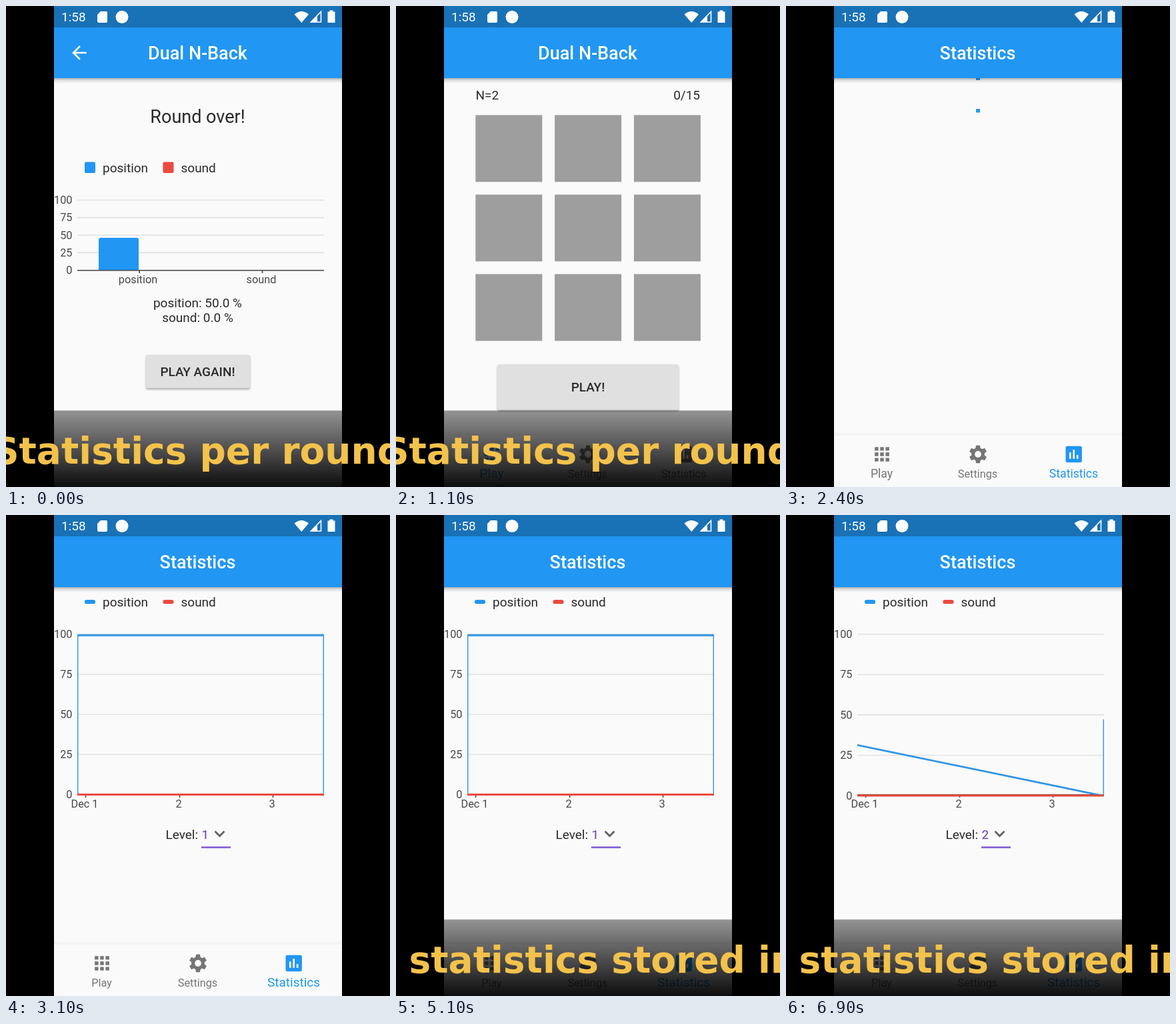
These frames come from a looping animation (576 px wide and 720 px high, 7 s). An HTML page:

```html
<!DOCTYPE html>
<html lang="en">
<head>
<meta charset="utf-8">
<title>Dual N-Back</title>
<style>
html, body { margin: 0; height: 100%; overflow: hidden; background: #000; }
svg { display: block; width: 576px; height: 720px; }
text { font: 19px Roboto, sans-serif; fill: #2a2a2a; }
.title { font-size: 27px; font-weight: 500; fill: #fff; }
.head { font-size: 27px; }
.tick { font-size: 16.3px; fill: #484848; }
.btn { font-weight: 500; }
.mid { text-anchor: middle; }
.end { text-anchor: end; }
.paper { fill: #fafafa; }
.blue { fill: #2196f3; }
.red { fill: #ea4a3f; }
.level { fill: #673ab7; }
.raised { fill: #e0e0e0; filter: drop-shadow(0 2px 1.5px rgba(0,0,0,.32)); }
.grid { stroke: #e0e0e0; stroke-width: 1.4; }
.axis { stroke: #484848; stroke-width: 1.6; }
.nav { color: #757575; }
.nav.on { color: #2196f3; }
.nav * { fill: currentColor; }
.nav .paper { fill: #fafafa; }
.nav text { font-size: 16.3px; }
#menuBox { filter: drop-shadow(0 5px 6px rgba(0,0,0,.28)) drop-shadow(0 4px 17px rgba(0,0,0,.25)); }
#captionText { font: bold 55px "DejaVu Sans", sans-serif; fill: #f3c24c; }
</style>
</head>
<body>
<svg viewBox="0 0 576 720">
  <defs>
    <linearGradient id="shade" x2="0" y2="1">
      <stop stop-opacity=".41"/><stop offset="1" stop-opacity=".95"/>
    </linearGradient>
    <linearGradient id="drop" x2="0" y2="1">
      <stop stop-opacity=".3"/><stop offset=".4" stop-opacity=".11"/><stop offset="1" stop-opacity="0"/>
    </linearGradient>
    <linearGradient id="lift" x2="0" y2="1">
      <stop stop-opacity="0"/><stop offset="1" stop-opacity=".035"/>
    </linearGradient>
    <clipPath id="phone"><path d="M72 0h432v720H72z"/></clipPath>
    <clipPath id="plot"><path d="M107 170h370v260H107z"/></clipPath>
    <g id="bar">
      <path class="blue" d="M72 0h432v108H72z"/>
      <path fill="url(#drop)" d="M72 108h432v8H72z"/>
    </g>
  </defs>

  <g clip-path="url(#phone)">
    <path class="paper" d="M72 0h432v720H72z"/>

    <g id="home">
      <text x="119.5" y="140">N=2</text>
      <text class="end" x="456" y="140">0/15</text>
      <g id="cells" fill="#9e9e9e"></g>
      <rect class="raised" x="152" y="536.5" width="272" height="68" rx="3"/>
      <text class="btn mid" x="288" y="577">PLAY!</text>
    </g>

    <g id="stats">
      <g id="spinner" class="blue"><path d="M285 106h6v5h-6zM285 154h6v5.5h-6z"/></g>
      <g id="report">
        <rect class="blue" x="118" y="127" width="16" height="6" rx="2.5"/>
        <text x="145" y="137">position</text>
        <rect class="red" x="235.5" y="127" width="16" height="6" rx="2.5"/>
        <text x="262.5" y="137">sound</text>
        <g id="chart"></g>
        <text x="239.5" y="485">Level:</text>
        <text class="level" id="levelText" x="293.5" y="485"></text>
        <path d="M313.5 473.5l7 7 7-7" fill="none" stroke="#616161" stroke-width="2.8"/>
        <path d="M293 497.5h44" stroke="#7e57d2" stroke-width="2.4"/>
      </g>
    </g>

    <use href="#bar"/>
    <text class="title mid" id="title" x="287.5" y="80"></text>

    <path fill="url(#lift)" d="M72 637h432v6H72z"/>
    <path class="paper" d="M72 643h432v77H72z"/>
    <g class="nav">
      <g transform="translate(127.7 654.7) scale(1.357)">
        <path d="M4 4h4v4H4zm6 0h4v4h-4zm6 0h4v4h-4zM4 10h4v4H4zm6 0h4v4h-4zm6 0h4v4h-4zM4 16h4v4H4zm6 0h4v4h-4zm6 0h4v4h-4z"/>
      </g>
      <text class="mid" x="143.5" y="705.5">Play</text>
    </g>
    <g class="nav">
      <g transform="translate(288 671) scale(1.357)">
        <circle r="7.3"/>
        <g id="teeth"></g>
        <circle class="paper" r="3.6"/>
      </g>
      <text class="mid" x="287.5" y="705.5">Settings</text>
    </g>
    <g class="nav">
      <g transform="translate(415.4 654.7) scale(1.357)">
        <rect x="3" y="3" width="18" height="18" rx="2"/>
        <path class="paper" d="M7 10h2v7H7zM11 7h2v10h-2zM15 13h2v4h-2z"/>
      </g>
      <text class="mid" x="431.5" y="705.5">Statistics</text>
    </g>

    <g id="menu">
      <rect class="paper" id="menuBox" x="272" y="434.5" width="97" rx="2"/>
      <g id="items">
        <g id="press">
          <path fill="#ebeded" d="M272 511h96.500v64H272z"/>
          <circle cx="313" cy="535" r="6.500" fill="#dfe0e0"/>
        </g>
        <text class="level" x="293.500" y="485">1</text>
        <text class="level" x="293.500" y="550">2</text>
      </g>
    </g>

    <g id="round">
      <path class="paper" d="M72 0h432v720H72z"/>
      <use href="#bar"/>
      <path fill="#fff" transform="translate(93.700 53.700) scale(1.357)" d="M20 11H7.830l5.590-5.590L12 4l-8 8 8 8 1.410-1.410L7.830 13H20z"/>
      <text class="title mid" x="287.5" y="80">Dual N-Back</text>
      <text class="head mid" x="287.5" y="174.5">Round over!</text>
      <rect class="blue" x="118" y="233.500" width="16" height="16.500" rx="2"/>
      <text x="145" y="248.500">position</text>
      <rect class="red" x="235.500" y="233.500" width="16" height="16.500" rx="2"/>
      <text x="262.500" y="248.500">sound</text>
      <g id="roundGrid"></g>
      <path class="blue" d="M139 396v-46q0-3 3-3h54q3 0 3 3v46z"/>
      <path class="axis" d="M107 395.700h370M200 396v4M384.500 396v4"/>
      <text class="tick mid" x="198" y="415">position</text>
      <text class="tick mid" x="383" y="415">sound</text>
      <text class="mid" x="287.500" y="451">position: 50.0 %</text>
      <text class="mid" x="287.500" y="472.500">sound: 0.0 %</text>
      <rect class="raised" x="210" y="522" width="156" height="50" rx="3"/>
      <text class="btn mid" x="287.500" y="553.500">PLAY AGAIN!</text>
    </g>

    <path fill-opacity=".25" d="M72 0h432v32H72z"/>
    <g fill="#fff">
      <text x="83" y="23" fill="#fff" style="fill:#fff">1:58</text>
      <path d="M142 8h8q2 0 2 2v13q0 2-2 2h-11q-2 0-2-2V13z"/>
      <circle cx="174" cy="16.500" r="9.500"/>
      <path d="M432.500 12.500q10.800-9 21.500 0L443.300 25z"/>
      <path d="M457.500 24h15V8.500z" fill="none" stroke="#fff" stroke-width="1.600"/>
      <path d="M456 24.500h11V14z"/>
      <path d="M482.500 8.500h3v-2h5v2h3V25h-11z"/>
    </g>
  </g>

  <g id="caption">
    <path fill="url(#shade)" d="M72 605.500h432V720H72z"/>
    <text id="captionText" y="685"></text>
  </g>
</svg>

<script>
const LOOP = 7000, STEP = 100;
const POP = 260, CAPTION_OFF = 1700, TAB = 2300, CHART_1 = 2500;
const CAPTION_ON = 5000, MENU_OPEN = 5300, PRESS = 5800, MENU_CLOSE = 5900, CHART_2 = 6000;

const el = id => document.getElementById(id);
const show = (id, on) => el(id).style.display = on ? '' : 'none';
const ramp = (t, from, length) => Math.min(1, Math.max(0, (t - from) / length));

function bezier(x1, y1, x2, y2) {
  const at = (a, b, s) => 3 * (1 - s) ** 2 * s * a + 3 * (1 - s) * s * s * b + s ** 3;
  return x => {
    let lo = 0, hi = 1;
    for (let i = 0; i < 20; i++) {
      const mid = (lo + hi) / 2;
      if (at(x1, x2, mid) < x) lo = mid; else hi = mid;
    }
    return at(y1, y2, lo);
  };
}
const easeIn = bezier(.42, 0, 1, 1);
const fastOutSlowIn = bezier(.4, 0, .2, 1);

function gridRows(top, bottom) {
  return [100, 75, 50, 25, 0].map(value => {
    const y = bottom - (bottom - top) * value / 100;
    return `<path class="grid" d="M107 ${y}h370"/>
      <text class="tick end" x="99.5" y="${y + 5.5}">${value}</text>`;
  }).join('');
}

function lineChart(level, grow) {
  const base = level === 1 ? 418.5 : 420;
  const up = height => base - height * grow;
  const line = level === 1
    ? `M107 ${base}V${up(238.5)}H477V${base}`
    : `M105 ${up(76)}L472 ${base - .5}H477V${up(114)}`;
  const dates = [['Dec 1', 118], ['2', 259], ['3', 399]].map(([label, x]) =>
    `<path class="axis" d="M${x + 1.5} 419v4"/><text class="tick mid" x="${x}" y="437.5">${label}</text>`);
  return gridRows(178.5, base) + dates.join('') + `
    <path class="axis" d="M107 418.7h370"/>
    <g clip-path="url(#plot)" fill="none" stroke-width="2.8">
      <path stroke="#2f95e4" d="${line}"/>
      <path stroke="#ea4a3f" d="M107 ${base}h370"/>
    </g>`;
}

for (let i = 0; i < 9; i++)
  el('cells').innerHTML += `<rect x="${119.3 + i % 3 * 118.8}" y="${163.3 + (i / 3 | 0) * 119}" width="100" height="100"/>`;
for (let i = 0; i < 6; i++)
  el('teeth').innerHTML += `<path d="M-2.9-5l.7-4.7h4.400l.7 4.700z" transform="rotate(${i * 60})"/>`;
el('roundGrid').innerHTML = gridRows(290.5, 395.5);
const tabs = [...document.querySelectorAll('.nav')];

function draw(t) {
  const inStats = t >= TAB;
  show('home', !inStats);
  show('stats', inStats);
  el('title').textContent = inStats ? 'Statistics' : 'Dual N-Back';

  // The round page drops a quarter of the screen while fading out.
  const stay = 1 - ramp(t, POP, 300);
  show('round', stay > 0);
  el('round').setAttribute('opacity', easeIn(stay));
  el('round').setAttribute('transform', `translate(0 ${180 * (1 - fastOutSlowIn(stay))})`);

  const swap = ramp(t, TAB, 200);
  [1 - swap, 0, swap].forEach((chosen, i) => {
    tabs[i].classList.toggle('on', i === (inStats ? 2 : 0));
    tabs[i].lastElementChild.style.fontSize = 16.3 + 2.7 * chosen + 'px';
  });

  const level = t < MENU_CLOSE ? 1 : 2;
  const loading = t < CHART_1 || (t >= MENU_CLOSE && t < CHART_2);
  show('spinner', loading);
  show('report', !loading);
  el('levelText').textContent = level;
  el('chart').innerHTML = lineChart(level, fastOutSlowIn(ramp(t, level === 1 ? CHART_1 : CHART_2, 300)));

  const open = ramp(t, MENU_OPEN, 300);
  show('menu', open > 0 && t < CHART_2);
  el('menu').setAttribute('opacity', ramp(open, 0, .25));
  el('menuBox').setAttribute('height', 76 + 75.5 * ramp(open, .25, .25));
  el('items').setAttribute('opacity', ramp(open, .5, .5));
  show('press', t >= PRESS);

  const first = t < CAPTION_OFF, caption = el('captionText');
  show('caption', first || t >= CAPTION_ON);
  caption.textContent = first ? 'Statistics per round' : 'Past statistics stored in';
  caption.setAttribute('x', first ? 288 : 601);
  caption.setAttribute('text-anchor', first ? 'middle' : 'end');
}

const start = performance.now();
function tick() {
  const t = (performance.now() - start) % LOOP;
  draw(Math.floor(t / STEP) * STEP);
  requestAnimationFrame(tick);
}
tick();
</script>
</body>
</html>
```
